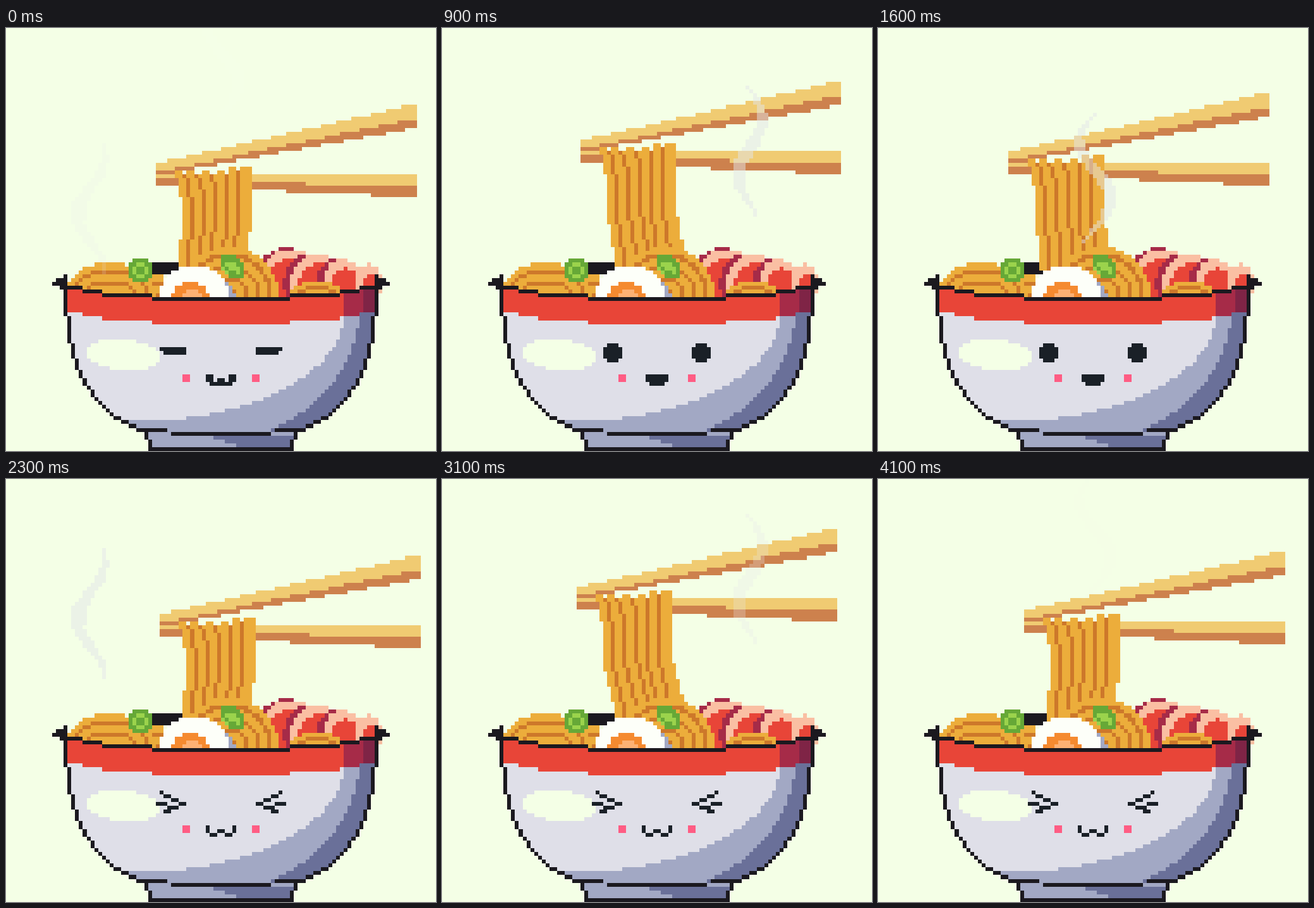
An HTML page with a canvas for the animation above (4200 ms loop, 680 by 668 pixels).

```html
<!DOCTYPE html>
<html lang="en">
<head>
<meta charset="utf-8">
<title>Happy noodle bowl</title>
<style>
html, body { margin: 0; width: 100%; height: 100%; overflow: hidden; background: #f4ffe6; }
canvas { display: block; width: 680px; height: 668px; image-rendering: pixelated; }
</style>
</head>
<body>
<canvas id="stage" width="112" height="110"></canvas>
<script>
const ctx = document.getElementById('stage').getContext('2d');
const BG = '#f4ffe6', INK = '#1b191f', EYE = '#1a2027', NOODLE = '#ecad3b', SOY = '#cd782a',
  LIGHT = '#dfdfe8', MID = '#a2a8c4', DARK = '#6a7099', RED = '#e84538', WINE = '#a62b48',
  PINK = '#fabfa3', LEAF = '#66a837', LIME = '#9bd34c', WOOD = '#f0cb72', BARK = '#cd814d';
const WIDTH = 112, LOOP = 4200, BOB = 2100, TAU = Math.PI * 2;
const { round, floor, sqrt, sin, cos, max, min, abs } = Math;

function rect(color, x, y, w, h = 1) {
  ctx.fillStyle = color;
  ctx.fillRect(x, y, w, h);
}

// Unsmoothed ellipse; slant moves each row sideways.
function blob(color, cx, cy, rx, ry, slant = 0) {
  for (let y = floor(cy - ry); y < cy + ry; y++) {
    const d = y + .5 - cy, half = rx * sqrt(max(0, 1 - (d / ry) ** 2));
    const left = round(cx + d * slant - half);
    rect(color, left, y, round(cx + d * slant + half) - left);
  }
}

function line(color, x1, y1, x2, y2) {
  const n = max(abs(x2 - x1), abs(y2 - y1));
  for (let k = 0; k <= n; k++) rect(color, round(x1 + (x2 - x1) * k / n), round(y1 + (y2 - y1) * k / n), 1);
}

// Draws a part and its mirror image.
function both(part) {
  part();
  ctx.save();
  ctx.translate(WIDTH, 0);
  ctx.scale(-1, 1);
  part();
  ctx.restore();
}

function stickPose(t) {
  const a = (t - 300) / BOB * TAU, b = (t - 70) / BOB * TAU;
  return [
    round(4 * cos(a) - 2.35),
    round(3.5 * cos(b) - .6 * cos(2 * b) - 3.3)
  ];
}

function lowerStick(dx, dy) {
  for (let c = 39; c < 107; c++) {
    const mid = c < 45 ? 39 : c < 78 ? 40 : 41;
    const end = 41 + (c > 44) + (c > 72) + (c > 94);
    rect(WOOD, c + dx, 38 + dy, 1, mid - 38);
    rect(BARK, c + dx, mid + dy, 1, end - mid);
  }
}

function upperStick(dx, dy) {
  for (let c = 39; c < 107; c++) {
    const top = 35 - max(0, floor((c - 42) / 4.35 + 1));
    const mid = 37 - floor((c - 39) / 4.8), end = 38 - floor((c - 38) / 5.5);
    rect(WOOD, c + dx, top + dy, 1, mid - top);
    rect(BARK, c + dx, mid + dy, 1, end - mid);
  }
}

// The top follows the sticks, the bottom bends back towards the bowl.
function hangingNoodles(dx, dy) {
  const bend = round(-.6 * dy - 1.2);
  const strands = paint => {
    for (let i = 0; i < 6; i++) {
      const top = i > 3 ? 36 : 37;
      for (let r = top; r < 63 - dy; r++) {
        const lean = (i < 3 && r < 44 - 2 * i) + (i < 2 && r < 39);
        const k = min(1, max(0, (r + dy - 48 + i % 3) / 12));
        paint(46 + 3 * i + dx - lean + round(bend * k), r + dy, r === top, i === 5);
      }
    }
  };
  strands((x, y, tip, last) => rect(NOODLE, x, y, last ? 3 : tip ? 2 : 4));
  strands((x, y, tip, last) => { if (!tip && !last) rect(SOY, x + 2, y, 1); });
}

function meat() {
  for (let i = 0; i < 4; i++) {
    const left = 64 + 8.3 * i, rx = 9 - 1.5 * i, ry = 9 - 1.3 * i, cx = left + rx;
    if (i < 3) blob(WINE, cx, 66.3, rx, ry);
    blob(PINK, cx + 1, 66.3, rx - 1, ry - .2);
    blob(RED, cx + 1.8, 67, rx - 2.2, ry - 1.8);
  }
}

function mound(cx, cy, rx, ry) {
  blob(NOODLE, cx, cy, rx, ry);
  for (let d = 1.5; d < min(rx, ry) - 1; d += 3) {
    blob(SOY, cx, cy, rx - d, ry - d);
    blob(NOODLE, cx, cy, rx - d - 1, ry - d - 1);
  }
}

function toppings() {
  mound(38, 72, 8, 8);
  mound(27, 70, 12, 9);
  mound(58, 70, 13, 13);
  mound(81, 70, 7, 4.5);

  blob(MID, 50, 71.5, 10, 9);
  blob('#fdfff9', 49, 71.5, 9.5, 10);
  blob('#f58a30', 48, 71, 5, 5);
  blob('#fdb174', 48.5, 71, 2.5, 3);

  blob(LEAF, 35, 63, 3.2, 3);
  blob(LIME, 35, 63, 2.2, 2);
  rect(LEAF, 34, 62, 2, 2);
  blob(LEAF, 59, 62, 3.2, 3, .3);
  blob(LIME, 58.5, 62.5, 2.3, 2, .3);
  line(LEAF, 56, 61, 60, 64);
}

// Left side of the bowl at a row.
const side = y => round(56 - 40.8 * (1 - ((y - 67) / 39.3) ** 2.3) ** .31);

// Right-hand limit of a round patch of light.
const glow = (y, cx, cy, rx, ry) => round(cx + rx * sqrt(max(0, 1 - ((y - cy) / ry) ** 2)));

function bowl() {
  rect(MID, 37, 105, 38, 4);
  for (let i = 0; i < 3; i++) rect(DARK, 54 + 3 * i, 106 + i, 21 - 3 * i);

  for (let y = 68; y < 105; y++) {
    const left = side(y), right = WIDTH - left;
    if (y > 73) {
      const mid = y > 101 ? left : glow(y, 32, 74, 56, 28), dark = glow(y, 50, 72, 42, 36);
      rect(LIGHT, left, y, right - left);
      rect(MID, mid, y, max(0, right - mid));
      rect(DARK, dark, y, max(0, right - dark));
    }
    const step = y < 104 ? side(y + 1) - left : 8;
    both(() => rect(INK, left, y, max(1, step)));
  }

  for (let c = 15; c < 97; c++) {
    const m = min(c, 111 - c), rim = 67 + (m > 19) + (m > 24) + (m > 37);
    if (m > 15) rect(c > 92 ? '#7f2446' : c > 87 ? WINE : RED, c, rim + 1, 1, 6);
    rect(INK, c, rim, 1);
  }

  both(() => {
    rect(INK, 15, 64, 1);
    rect(INK, 13, 65, 3);
    rect(INK, 12, 66, 4);
    rect(INK, 14, 67, 2);
    rect(INK, 36, 105, 1, 2);
    rect(INK, 37, 107, 1, 2);
  });
  rect(INK, 43, 105, 26);
  rect(INK, 37, 109, 38);
  blob(BG, 30.5, 85, 9.3, 4.1, .4);
}

function closedEye() {
  rect(EYE, 40, 83, 7);
  rect(EYE, 41, 84, 6);
  rect(EYE, 52, 90, 2, 2);
  rect(EYE, 53, 92, 3);
}

function openEye() {
  rect(EYE, 42, 83, 5, 3);
  rect(EYE, 43, 82, 3, 5);
  rect(EYE, 53, 90, 3, 2);
  rect(EYE, 54, 92, 2);
}

function squintEye() {
  line(EYE, 40, 81, 46, 84);
  line(EYE, 41, 86, 46, 84);
  line(EYE, 39, 84, 44, 85);
  rect(EYE, 52, 90, 1, 2);
  rect(EYE, 53, 92, 2);
}

function face(t) {
  both(() => rect('#ff5d84', 46, 90, 2, 2));
  both(t < 700 ? closedEye : t < 2100 ? openEye : squintEye);
  rect(EYE, 55, 91, 2);
}

const wisps = [
  { peak: 200, top: 18, x: 21.7, sway: 3.6, bend: 3 },
  { peak: 900, top: 15, x: 79.8, sway: 3, bend: 8 },
  { peak: 1600, top: 22, x: 56, sway: -4.2, bend: 7 }
];

function steam(t) {
  for (const { peak, top, x, sway, bend } of wisps) {
    const age = (t - peak + 300 + 2 * BOB) % BOB - 300;
    const y = top - round(age * .06);
    ctx.globalAlpha = .5 * (age < 0 ? 1 + age / 300 : Math.exp(-age / 170));
    for (let r = 0; r < 34; r++) {
      const w = 1 + round(2.6 * sin(Math.PI * r / 33));
      rect('#e4e6ea', round(x + sway * cos(TAU * (r - bend) / 30) - w / 2 + .5), y + r, w);
    }
  }
  ctx.globalAlpha = 1;
}

function draw(t) {
  const [dx, dy] = stickPose(t);
  rect(BG, 0, 0, WIDTH, 110);
  rect(INK, 31, 62, 4, 2);
  rect(INK, 38, 61, 9, 3);
  rect(INK, 62, 61, 3, 4);
  meat();
  lowerStick(dx, dy);
  hangingNoodles(dx, dy);
  upperStick(dx, dy);
  toppings();
  bowl();
  face(t);
  steam(t);
}

function tick(now) {
  draw(floor(now % LOOP / 100) * 100);
  requestAnimationFrame(tick);
}
draw(0);
requestAnimationFrame(tick);
</script>
</body>
</html>
```
